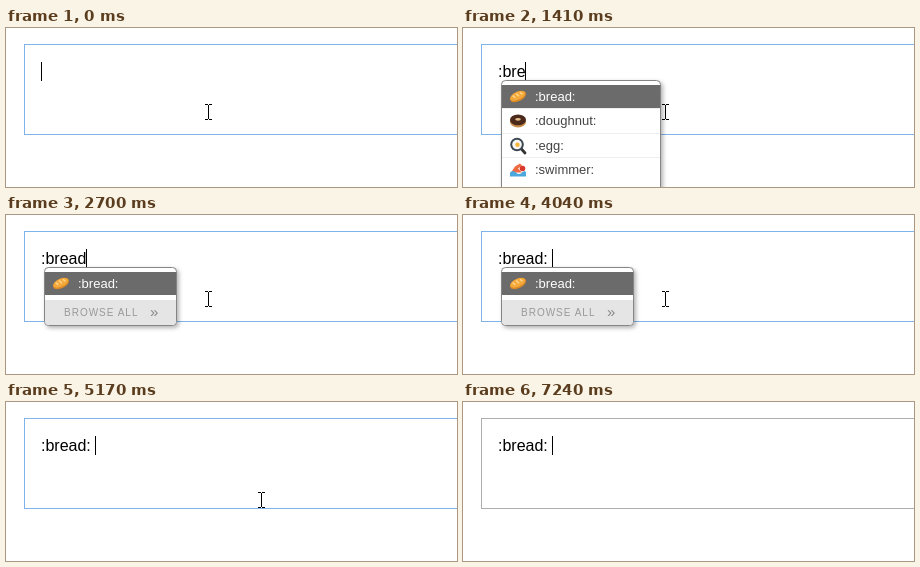
These frames come from a looping animation (451x159 px, 7.71 s). An HTML page:

```html
<!DOCTYPE html>
<html lang="en">
<head>
<meta charset="utf-8">
<title>Emoji autocomplete</title>
<style>
  html, body { margin: 0; width: 100%; height: 100%; overflow: hidden; background: #fff; }
  svg { display: block; font-family: "Liberation Sans", Arial, sans-serif; }
  #typed { font-size: 16px; white-space: pre; }
  .panel { fill: #fff; stroke: #858585; filter: drop-shadow(2px 2px 2px rgba(0, 0, 0, .3)); }
  .name { font-size: 13px; fill: #444; }
  .name.active { fill: #fff; }
  .footer { font-size: 10px; letter-spacing: 1px; fill: #999; }
</style>
</head>
<body>
<svg width="451" height="159" viewBox="0 0 451 159">
  <defs>
    <g id="m">
      <circle r="8" fill="#1b6fae"/>
      <path d="M-4.3 4.5V-4.5L0 2L4.3-4.5V4.5" fill="none" stroke="#fff" stroke-width="2.2"/>
    </g>
    <g id="v" fill="none" stroke="#f3c5a5" stroke-linecap="round">
      <path d="M-1.5 1L-4-6M1.5 1L3-6.5" stroke-width="2.8"/>
      <path d="M-3 2L3 2L2 5H-1Z" fill="#f3c5a5" stroke-width="4" stroke-linejoin="round"/>
      <path d="M-4 2L1 3L-1 5M2 0V3" stroke="#d79b78" stroke-width=".8"/>
    </g>
    <path id="x" d="M-6.5-6.5L6.5 6.5M6.5-6.5L-6.5 6.5" stroke="#e8232a" stroke-width="4"/>
    <circle id="o" r="7" fill="none" stroke="#b5122d" stroke-width="2.2"/>
    <g id="square"><rect x="-8" y="-8" width="16" height="16" rx="1.5" fill="#e8232a"/></g>
    <g id="a"><use href="#square"/><path d="M-4 5L0-5L4 5M-2.5 2H2.5" fill="none" stroke="#fff" stroke-width="2"/></g>
    <g id="b"><use href="#square"/><path d="M-3-4.5V4.5H1C5 4.5 5 0 1 0H-3H1C4 0 4-4.5 1-4.5Z" fill="none" stroke="#fff" stroke-width="2"/></g>
    <g id="ab"><use href="#square"/><path d="M-6.5 4L-3.7-4L-1 4M-5.5 1.5H-2M1.5-4V4H4C7 4 7 0 4 0H1.5H4C6 0 6-4 4-4Z" fill="none" stroke="#fff" stroke-width="1.4"/></g>
    <g id="bread" transform="rotate(-25)">
      <ellipse rx="8.6" ry="4.8" fill="#d98a27"/>
      <ellipse cy="-.8" rx="8" ry="3.9" fill="#f5a93b"/>
      <path d="M-4.5-3L-3 0M-.5-3.6L1 0M3.5-3L5-.2" stroke="#ffd58a" stroke-width="1.5"/>
    </g>
    <g id="doughnut">
      <ellipse cy="1.3" rx="8" ry="5.6" fill="#c58a4a"/>
      <ellipse cy="-.6" rx="8" ry="5.4" fill="#4b2a1c"/>
      <ellipse cy="-1.2" rx="2.8" ry="1.4" fill="#e3bd8c"/>
    </g>
    <g id="egg">
      <path d="M3 3L7 7.5" stroke="#333" stroke-width="2.8" stroke-linecap="round"/>
      <circle cx="-1" cy="-1" r="6.8" fill="#3b4650"/>
      <circle cx="-1" cy="-1" r="4.8" fill="#f5f5f2"/>
      <circle cx="-.5" cy="-.8" r="2.2" fill="#f6b63a"/>
    </g>
    <g id="swimmer">
      <path d="M-7 3L-3-3L2-6L4-4L0-1L4 3Z" fill="#ee6b42"/>
      <circle cx="4.5" cy="-1" r="2.8" fill="#d9372c"/>
      <path d="M-8 3Q-5 0-2 3T4 3T8 3V7H-8Z" fill="#4aa8dc"/>
    </g>
  </defs>
  <rect id="field" x="18.5" y="16.5" width="440" height="90" fill="#fff"/>
  <text id="typed" x="35" y="49"></text>
  <rect id="caret" y="34" width="1" height="19"/>
  <g id="menu"></g>
  <path id="pointer" fill="none" stroke="#000" d="M-3 .5H0M1 .5H4M.5 1V15M-3 15.5H0M1 15.5H4"/>
</svg>
<script>
const LOOP = 7710;
const BLUE = '#7eb4ea', GREY = '#adadad';
const CARET_X = { '': 35, ':': 39, ':b': 48, ':br': 53, ':bre': 62, ':brea': 71, ':bread': 80, ':bread: ': 89 };

const MENUS = {
  short: { width: 132, names: ['m', 'v', 'x', 'o', 'a'] },
  letter: { width: 132, names: ['b', 'ab', 'bread', 'doughnut'] },
  food: { width: 159, names: ['bread', 'doughnut', 'egg', 'swimmer'] },
  match: { width: 132, names: ['bread'], footer: true }
};

// Each step lists only what changes at that time.
const STEPS = [
  [0, { text: '', caret: true, menu: null, mouse: [202, 76], border: BLUE }],
  [230, { caret: false }],
  [720, { caret: true }],
  [930, { text: ':' }],
  [1050, { menu: 'short' }],
  [1180, { text: ':b', menu: 'letter' }],
  [1290, { text: ':br', menu: 'food' }],
  [1400, { text: ':bre' }],
  [1510, { text: ':brea' }],
  [1620, { text: ':bread' }],
  [1720, { menu: 'match' }],
  [2200, { caret: false }],
  [2700, { caret: true }],
  [3300, { caret: false }],
  [3790, { caret: true }],
  [4040, { text: ':bread: ' }],
  [4140, { menu: null }],
  [4590, { caret: false }],
  [4960, { mouse: [215, 79] }],
  [5070, { mouse: [242, 87], caret: true }],
  [5170, { mouse: [255, 90] }],
  [5660, { caret: false }],
  [6140, { caret: true, mouse: [258, 96] }],
  [6260, { mouse: null, border: '#96b0cc' }],
  [6380, { border: GREY }],
  [6740, { caret: false }],
  [7240, { caret: true }]
];

const el = id => document.getElementById(id);
const [field, typed, caret, menu, pointer] = ['field', 'typed', 'caret', 'menu', 'pointer'].map(el);

function menuMarkup({ width, names, footer }) {
  const rows = names.map((name, i) => {
    const y = Math.round(57 + 24.4 * i);
    const backing = i
      ? `<rect x="39" y="${y - 1}" width="${width - 1}" height="1" fill="#eee"/>`
      : `<rect x="39" y="${y}" width="${width - 1}" height="23" fill="#6b6b6b"/>`;
    return `${backing}<use href="#${name}" x="55" y="${y + 11.5}"/>
      <text class="name${i ? '' : ' active'}" x="72" y="${y + 16}">:${name}:</text>`;
  });
  const browse = `<path d="M39 85H${38 + width}V106Q${38 + width} 110 ${34 + width} 110H43Q39 110 39 106Z" fill="#e5e5e5"/>
    <text class="footer" x="58" y="101">BROWSE ALL</text>
    <text x="144" y="102" font-size="15" fill="#888">»</text>`;
  return `<rect class="panel" x="38.5" y="52.5" width="${width}" height="${footer ? 58 : 140}" rx="4"/>
    ${rows.join('')}${footer ? browse : ''}`;
}

const states = [];
STEPS.reduce((state, [time, change]) => {
  const next = { ...state, ...change, time };
  states.push(next);
  return next;
}, {});

let shown = null;
function draw(now) {
  const time = now % LOOP;
  const state = states.findLast(s => s.time <= time);
  if (state !== shown) {
    field.setAttribute('stroke', state.border);
    typed.textContent = state.text;
    caret.setAttribute('x', CARET_X[state.text]);
    caret.style.visibility = state.caret ? 'visible' : 'hidden';
    menu.innerHTML = state.menu ? menuMarkup(MENUS[state.menu]) : '';
    pointer.style.visibility = state.mouse ? 'visible' : 'hidden';
    if (state.mouse) pointer.setAttribute('transform', `translate(${state.mouse})`);
    shown = state;
  }
}

const start = performance.now();
function tick() {
  draw(performance.now() - start);
  requestAnimationFrame(tick);
}
tick();
</script>
</body>
</html>
```
